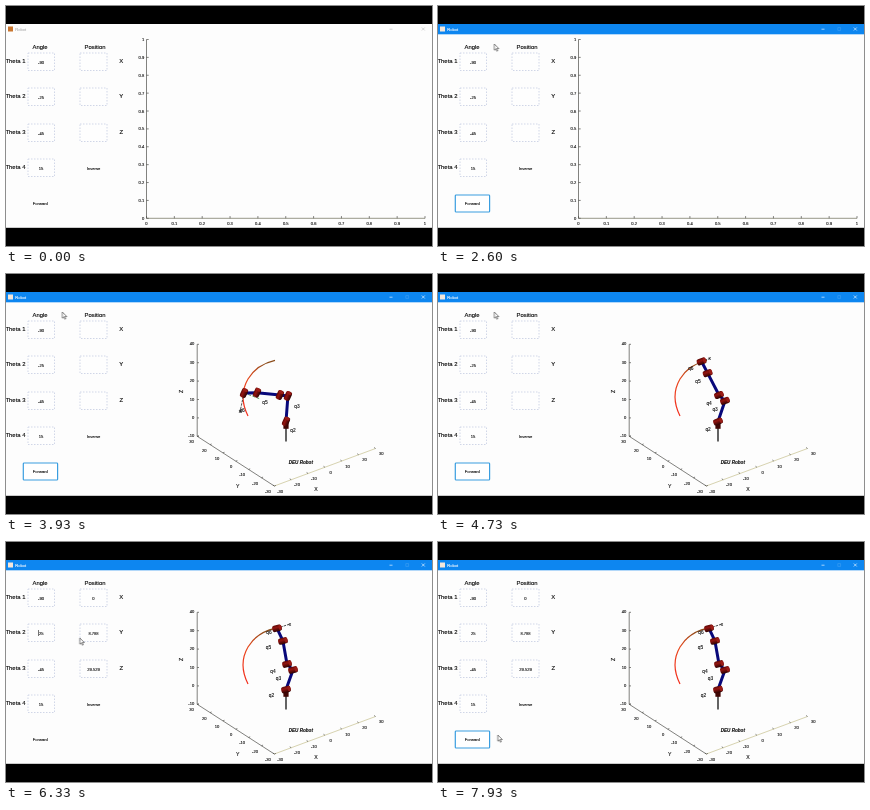
Animation, 426 px wide and 240 px high, one loop 8000 ms. Source, as an HTML page:

```html
<!DOCTYPE html>
<html lang="en">
<head>
<meta charset="utf-8">
<title>Robot</title>
<style>
html, body { margin: 0; width: 100%; height: 100%; overflow: hidden; background: #000; }
svg { display: block; width: 100%; height: 100%; }
text { font-family: "Liberation Sans", Arial, sans-serif; font-size: 4.1px; fill: #111; stroke: #111; stroke-width: .12; }
.head { font-size: 5.9px; fill: #000; }
.mid { text-anchor: middle; }
.end { text-anchor: end; }
.field { fill: #fefefe; stroke: #c6cde2; stroke-width: .8; stroke-dasharray: 1.5 1.5; }
.axis { fill: none; stroke: #4c4c48; stroke-width: .7; }
.floor { stroke: #c6c08e; }
.switch { animation: 8s step-end infinite; }
#active { animation-name: active; }
#focus { animation-name: focus; }
#flat { animation-name: flat; }
#space { animation-name: space; }
#result { animation-name: result; }
#before { animation-name: before; }
#after { animation-name: after; }
#caret { animation-name: caret; }
#pointer { animation: point 8s ease-in-out infinite; }
@keyframes active { 0% { opacity: 0 } 8.75%, 100% { opacity: 1 } }
@keyframes focus { 0% { opacity: 0 } 8.75% { opacity: 1 } 72.5% { opacity: 0 } 91.25%, 100% { opacity: 1 } }
@keyframes flat { 0% { opacity: 1 } 40%, 100% { opacity: 0 } }
@keyframes space { 0% { opacity: 0 } 40%, 100% { opacity: 1 } }
@keyframes result { 0% { opacity: 0 } 65%, 100% { opacity: 1 } }
@keyframes before { 0% { opacity: 1 } 76.25%, 100% { opacity: 0 } }
@keyframes after { 0% { opacity: 0 } 76.25%, 100% { opacity: 1 } }
@keyframes caret { 0% { opacity: 0 } 72.5% { opacity: 1 } 91.25%, 100% { opacity: 0 } }
@keyframes point {
  0%, 3% { transform: translate(60px, 170px); opacity: 0 }
  3.1% { transform: translate(60px, 170px); opacity: 1 }
  7%, 9.5% { transform: translate(38px, 196px) }
  16.4% { transform: translate(42.6px, 42.8px) }
  19%, 66.5% { transform: translate(56.3px, 38px) }
  71.5%, 73.5% { transform: translate(35px, 90px) }
  78%, 84% { transform: translate(73.8px, 96px) }
  90%, 92.5% { transform: translate(40px, 196px) }
  97%, 100% { transform: translate(59.8px, 193px); opacity: 1 }
}
</style>
</head>
<body>
<svg viewBox="0 0 426 240" preserveAspectRatio="none">
  <defs>
    <linearGradient id="trail" x1="0" y1="1" x2=".6" y2="0">
      <stop offset="0" stop-color="#f42a1c"/>
      <stop offset=".55" stop-color="#e8481c"/>
      <stop offset="1" stop-color="#8a4a18"/>
    </linearGradient>
    <linearGradient id="metal" x1="0" y1="0" x2="0" y2="1">
      <stop offset="0" stop-color="#5c0806"/>
      <stop offset=".35" stop-color="#941410"/>
      <stop offset="1" stop-color="#2c0202"/>
    </linearGradient>
  </defs>
  <rect width="426" height="240"/>
  <rect y="18" width="426" height="203.8" fill="#fdfdfd"/>

  <rect x="2" y="20.5" width="5" height="5" fill="#c9762f"/>
  <text x="9.3" y="24.8" style="fill:#999;stroke:none">Robot</text>
  <path d="M383.5 23.2h3M415.8 21.5l3 3m0-3l-3 3" stroke="#bbb" stroke-width=".6"/>
  <g id="active" class="switch">
    <rect y="18" width="426" height="10.3" fill="#0d86f0"/>
    <rect x="2" y="20.5" width="5" height="5" fill="#f3e6da"/>
    <text x="9.3" y="24.8" style="fill:#fff;stroke:#fff">Robot</text>
    <path d="M383.5 23.2h3M415.8 21.5l3 3m0-3l-3 3" stroke="#e4f2ff" stroke-width=".7"/>
    <path d="M399.8 21.6h2.8v2.8h-2.8z" fill="none" stroke="#4aa4f2" stroke-width=".5"/>
  </g>

  <g id="form">
    <text class="head mid" x="34" y="43.2">Angle</text>
    <text class="head mid" x="89" y="43.2">Position</text>
  </g>
  <text class="mid" x="87.5" y="163.8">Inverse</text>
  <rect id="focus" class="switch" x="17.3" y="189" width="34.3" height="17" rx=".8" fill="#fff" stroke="#3a9ee0" stroke-width="1.2"/>
  <text class="mid" x="34.3" y="199.3">Forward</text>
  <text id="before" class="mid switch" x="35" y="92.5">-25</text>
  <text id="after" class="mid switch" x="35.2" y="92.5">25</text>
  <path id="caret" class="switch" d="M32.4 88v6" stroke="#222" stroke-width=".7"/>
  <g id="result" class="switch"></g>

  <g id="flat" class="switch">
    <path class="axis" d="M140.5 33.5V212.3"/>
    <path class="axis" d="M140.5 212.3H419" style="stroke:#6c6c58"/>
  </g>

  <g id="space" class="switch">
    <path class="axis" d="M191.2 70.3V162.3L268.3 212"/>
    <path class="axis floor" d="M268.3 212L369.5 174.5"/>
    <text class="mid" style="font-size:5.2px" x="310" y="217">X</text>
    <text class="mid" style="font-size:5.2px" x="231.8" y="213.8">Y</text>
    <text class="mid" style="font-size:5.2px" transform="translate(176.6 117.5) rotate(-90)">Z</text>
    <text class="mid" x="294.8" y="189.8" style="font-weight:bold;font-style:italic;font-size:4.6px">DEU Robot</text>
    <path d="M242 142C236 130 235 117 242 105C248 95 257 89 269 86.3" fill="none" stroke="url(#trail)" stroke-width="1.2"/>
    <g id="robot">
      <path d="M280 149V167.5" stroke="#111" stroke-width="1.3"/>
      <path id="side" stroke="#2f8a3c" stroke-width=".8" stroke-dasharray="3 1.5"/>
      <path id="tool" stroke="#222" stroke-width=".8" stroke-dasharray="2.5 1"/>
      <path id="links" fill="none" stroke="#08087a" stroke-width="3" stroke-linejoin="round"/>
      <rect x="277.4" y="147" width="5.2" height="7.8" fill="#400604"/>
    </g>
  </g>

  <path id="pointer" d="M0 0V6.2L1.5 4.9L2.5 7.2L3.5 6.7L2.5 4.5H4.5Z" fill="#fff" stroke="#333" stroke-width=".6"/>
</svg>
<script>
const byId = id => document.getElementById(id);

function add(parent, tag, attrs, content = "") {
  const node = document.createElementNS("http://www.w3.org/2000/svg", tag);
  for (const key in attrs) node.setAttribute(key, attrs[key]);
  node.textContent = content;
  parent.append(node);
  return node;
}
const label = (parent, x, y, content, cls = "mid") =>
  add(parent, "text", { x, y, class: cls }, content);

// Input form
const rows = [47, 82, 118, 153];
const angles = ["-90", "", "-45", "15"];
const positions = ["0", "8.788", "29.529"];
const form = byId("form");
rows.forEach((y, i) => {
  label(form, -.5, y + 9.5, `Theta ${i + 1}`, "head");
  add(form, "rect", { x: 22, y, width: 26.5, height: 17.5, class: "field" });
  label(form, 35, y + 10.5, angles[i]);
  if (i === 3) return;
  add(form, "rect", { x: 74, y, width: 27, height: 17.5, class: "field" });
  label(form, 115.3, y + 10, "XYZ"[i], "head mid");
  label(byId("result"), 87.5, y + 10.5, positions[i]);
});

// Axis ticks
const flat = byId("flat"), space = byId("space");
for (let i = 0; i <= 10; i++) {
  const x = 140.5 + 27.85 * i, y = 212.3 - 17.88 * i;
  add(flat, "path", { class: "axis", d: `M${x} 212.3v-2.2M140.5 ${y}h2.2` });
  label(flat, x, 218.8, i / 10);
  label(flat, 138.3, y + 1.5, i / 10, "end");
}
for (let i = 0; i <= 5; i++) {
  const y = 162.3 - 18.4 * i;
  add(space, "path", { class: "axis", d: `M191.2 ${y}h1.8` });
  label(space, 188.2, y + 1, i * 10 - 10, "end");
}
for (let i = 0; i <= 6; i++) {
  const x = 268.3 + 16.87 * i, y = 212 - 6.25 * i;
  const u = 268.3 - 12.85 * i, v = 212 - 8.28 * i;
  add(space, "path", { class: "axis", d: `M${x} ${y}l-1.4 -1M${u} ${v}l1.6 -.6` });
  label(space, x + 5.8, y + 6.5, i * 10 - 30);
  label(space, u - 3.5, v + 7, i * 10 - 30, "end");
}

// Arm poses: joint points, [length, degrees] of the last two links, tilt of the joints
const poses = [
  { s: 0, elbow: [280, 122], fore: [271, 122], arm: [23, 158], hand: [13, 122], tilt: -75,
    tool: [236, 156], side: [258, 140], names: [[287, 158], [291, 134], [282, 123], [258, 139], [238, 152]] },
  { s: .26, elbow: [282, 122], fore: [274, 121], arm: [23, 187], hand: [13, 181], tilt: -65,
    tool: [234, 137], side: [253, 124], names: [[287, 158.5], [291, 134.5], [282, 123], [259, 130], [236, 137]] },
  { s: .93, elbow: [287, 127], fore: [281, 121], arm: [24.6, 243], hand: [13.2, 243], tilt: -20,
    tool: [272, 84], side: [264, 87], names: [[270, 156.5], [277, 137.5], [271, 131], [260, 108.5], [253, 96]] },
  { s: 1, elbow: [287, 128], fore: [281, 122], arm: [23.4, 260], hand: [14, 245], tilt: -15,
    tool: [284, 82], side: [271, 86], names: [[265.5, 155], [272.5, 137.5], [267, 130.5], [262.5, 106.5], [263, 92]] }
];
const mix = (a, b, k) => Array.isArray(a) ? a.map((v, i) => mix(v, b[i], k)) : a + (b - a) * k;
const polar = ([x, y], [length, degrees]) => {
  const a = degrees * Math.PI / 180;
  return [x + length * Math.cos(a), y + length * Math.sin(a)];
};

const robot = byId("robot");
const names = [2, 3, 4, 5, 6].map(n => label(robot, 0, 0, "q" + n));
const toolName = label(robot, 0, 0, "x");
names.concat(toolName).forEach(n => {
  n.style.fontSize = "4.8px";
  robot.insertBefore(n, byId("links"));
});
const joints = Array.from({ length: 5 }, () => {
  const g = add(robot, "g", {});
  add(g, "rect", { x: -4.8, y: -3.2, width: 9.6, height: 6.4, rx: 2.2, fill: "url(#metal)" });
  add(g, "ellipse", { cx: 3.1, rx: 1.5, ry: 2.7, fill: "#9c1c16" });
  return g;
});

function place(node, [x, y]) {
  node.setAttribute("x", x);
  node.setAttribute("y", y);
}

function drawRobot(s) {
  const i = Math.min(2, poses.findLastIndex(p => p.s <= s));
  const a = poses[i], b = poses[i + 1];
  const k = (s - a.s) / (b.s - a.s);
  const at = key => mix(a[key], b[key], k);
  const fore = at("fore"), wrist = polar(fore, at("arm")), tip = polar(wrist, at("hand"));
  const points = [[280, 147.5], at("elbow"), fore, wrist, tip];
  const tool = at("tool");
  byId("links").setAttribute("d", "M" + points.join("L"));
  byId("tool").setAttribute("d", `M${tip}L${tool}`);
  byId("side").setAttribute("d", `M${tip}L${at("side")}`);
  place(toolName, [tool[0], tool[1] + 1.5]);
  at("names").forEach((p, n) => place(names[n], p));
  points.forEach((p, n) =>
    joints[n].setAttribute("transform", `translate(${p}) rotate(${at("tilt")})`));
}

// Quintic joint trajectory
const quintic = u => u * u * u * (10 - 15 * u + 6 * u * u);
let start;
function frame(now) {
  start ??= now;
  const t = (now - start) % 8000;
  drawRobot(quintic(Math.min(1, Math.max(0, (t - 3245) / 1905))));
  requestAnimationFrame(frame);
}
drawRobot(0);
requestAnimationFrame(frame);
</script>
</body>
</html>
```
